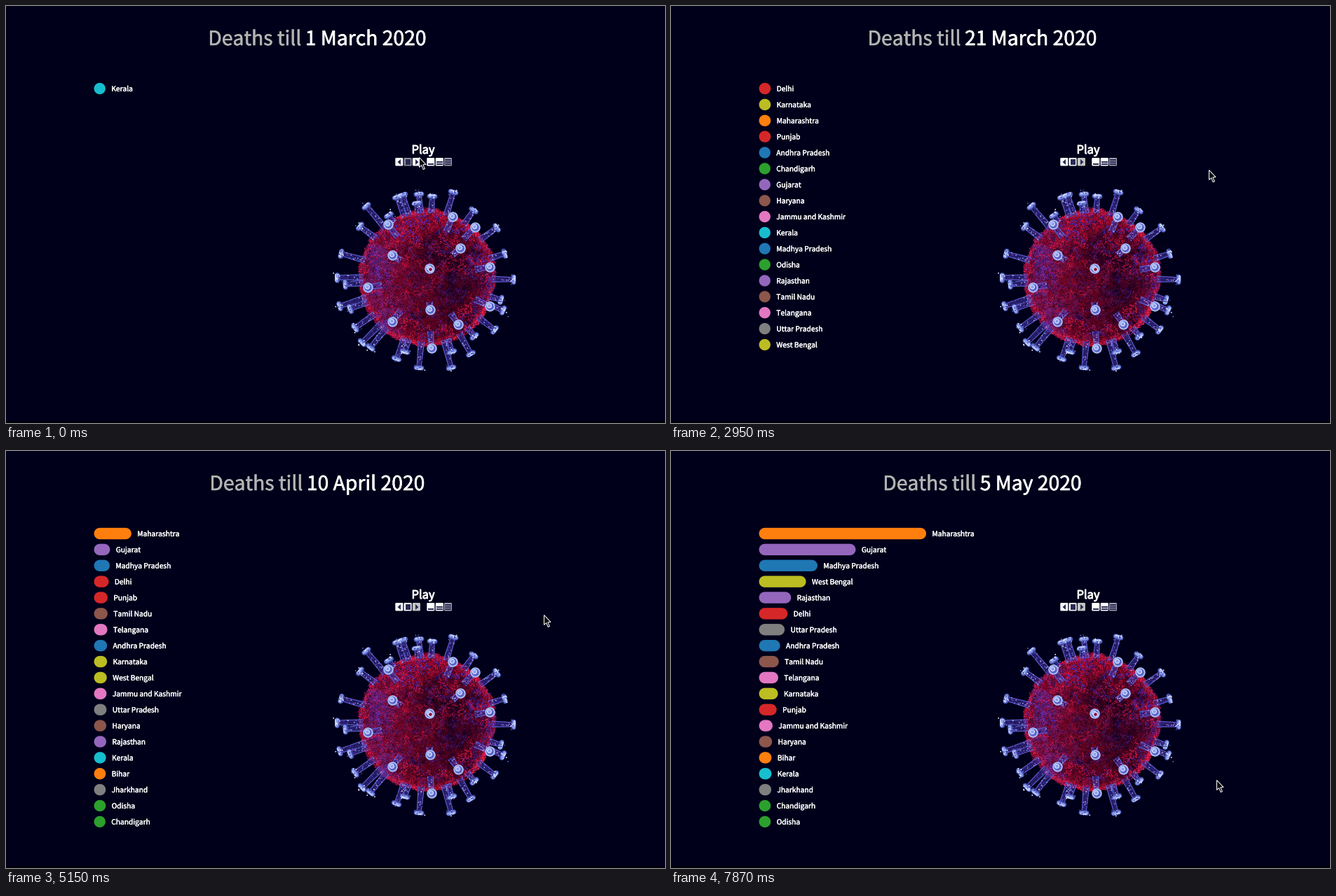
These frames come from a looping animation (940 px wide and 596 px high, 8000 ms). A matplotlib script:

```python
import numpy as np
import matplotlib.pyplot as plt
from matplotlib import patheffects
from matplotlib.animation import FuncAnimation
from matplotlib.collections import LineCollection, PolyCollection
from matplotlib.patches import FancyBboxPatch, Polygon, Rectangle

W, H, DPI = 940, 596, 100
PT = 72 / DPI
LOOP_MS, STEP_MS = 8000, 50
BACK = "#00001a"
FONT = "Noto Sans CJK JP"
rng = np.random.default_rng(4)

# first listed day, first death day, then deaths at KEY_DAYS[1:]; day 1 is 1 March
KEY_DAYS = [20, 32, 41, 49, 57, 66]
STATES = {
    "Andhra Pradesh": (12, 34, 0, 6, 15, 31, 36),
    "Bihar": (22, 23, 1, 1, 2, 2, 4),
    "Chandigarh": (19, 62, 0, 0, 0, 0, 1),
    "Delhi": (2, 14, 2, 12, 42, 54, 64),
    "Gujarat": (20, 23, 6, 17, 48, 133, 319),
    "Haryana": (4, 34, 0, 3, 3, 3, 6),
    "Jammu and Kashmir": (9, 27, 2, 4, 5, 6, 8),
    "Jharkhand": (32, 41, 0, 1, 2, 3, 3),
    "Karnataka": (9, 13, 3, 6, 13, 18, 28),
    "Kerala": (1, 29, 2, 2, 3, 4, 4),
    "Madhya Pradesh": (21, 26, 3, 16, 69, 99, 176),
    "Maharashtra": (9, 18, 9, 97, 201, 323, 583),
    "Odisha": (16, 39, 0, 1, 1, 1, 1),
    "Punjab": (9, 20, 3, 8, 13, 17, 23),
    "Rajasthan": (3, 35, 0, 3, 11, 33, 77),
    "Tamil Nadu": (7, 26, 1, 8, 15, 23, 31),
    "Telangana": (2, 29, 3, 7, 18, 26, 29),
    "Uttar Pradesh": (4, 31, 2, 4, 14, 29, 53),
    "West Bengal": (18, 24, 3, 5, 10, 18, 133),
}
COLORS = ["#1f77b4", "#ff7f0e", "#2ca02c", "#d62728", "#9467bd",
          "#8c564b", "#e377c2", "#7f7f7f", "#bcbd22", "#17becf"]

fig = plt.figure(figsize=(W / DPI, H / DPI), dpi=DPI, facecolor=BACK)
ax = fig.add_axes([0, 0, 1, 1])


def label(x, y, text, size, color="white", stroke=0.35):
    return ax.text(x, y, text, fontsize=size * PT, color=color, family=FONT,
                   va="baseline", ha="left",
                   path_effects=[patheffects.withStroke(
                       linewidth=stroke * PT, foreground=color)])


# ---- virus ----
CENTER, RADIUS = np.array([601.0, 388.0]), 98


def noise(n, slope):
    freq = np.hypot(*np.meshgrid(np.fft.fftfreq(n), np.fft.fftfreq(n)))
    freq[0, 0] = 1
    field = np.fft.ifft2(np.fft.fft2(rng.normal(size=(n, n))) / freq ** slope).real
    return (field - field.mean()) / field.std()


def ridge(field, width):
    return np.exp(-(field / width) ** 2)


def virus_body():
    n = 2 * RADIUS + 12
    yy, xx = (np.mgrid[:n, :n] - n / 2 + 0.5) / RADIUS
    rad = np.hypot(xx, yy)
    rgb = np.zeros((n, n, 3))

    def blend(color, amount):
        nonlocal rgb
        amount = np.clip(amount, 0, 1)[..., None]
        rgb = rgb * (1 - amount) + np.array(color) / 255 * amount

    blend((98, 4, 34), np.ones((n, n)))
    blend((160, 10, 48), 0.4 + 0.3 * noise(n, 1.3))
    blend((24, 0, 32), 0.3 * noise(n, 1.1) + 0.25 * (xx > 0.3))
    blend((125, 45, 165), (0.9 * np.exp(-((xx + 0.68) / 0.25) ** 2)
                           + 0.6 * np.exp(-((xx - 0.88) / 0.16) ** 2))
          * (0.5 + 0.3 * noise(n, 1)))
    blend((235, 28, 75), ridge(noise(n, 1.4), 0.16) * (0.45 + 0.5 * rad))
    blend((62, 50, 215), ridge(noise(n, 1.4), 0.17) * (0.25 + 0.6 * rad - 0.25 * yy))
    blend((230, 28, 70), ridge(rad - 0.96, 0.05) * (0.5 + 0.35 * noise(n, 0.8)))
    blend((16, 0, 40), 0.35 * (noise(n, 0.6) - 0.6))
    rgb *= rng.uniform(0.65, 1.2, (n, n, 1))
    edge = RADIUS * (1 - rad) + 1.2 * noise(n, 1)
    return np.dstack([np.clip(rgb, 0, 1), np.clip(edge + 0.5, 0, 1)])


TIPS = np.array([
    (514, 286), (558, 273), (566, 270), (589, 269), (586, 282), (608, 272),
    (638, 266), (667, 292), (637, 301), (700, 317), (711, 354), (724, 391),
    (690, 373), (648, 346), (545, 312), (505, 315), (478, 354), (551, 356),
    (472, 388), (484, 398), (516, 402), (476, 429), (491, 433), (498, 460),
    (508, 481), (520, 488), (557, 504), (569, 494), (589, 517), (635, 517),
    (636, 494), (663, 497), (645, 455), (697, 463), (709, 435), (706, 420),
    (690, 429), (605, 434), (604, 375), (551, 451), (607, 489), (669, 316),
    (546, 299), (668, 472)], float)


def draw_virus():
    size = RADIUS + 6
    cx, cy = CENTER
    ax.imshow(virus_body(), extent=(cx - size, cx + size, cy + size, cy - size),
              interpolation="bilinear", zorder=2)

    arm = TIPS - CENTER
    dist = np.hypot(*arm.T)[:, None]
    unit = arm / dist
    side = unit[:, ::-1] * [-1, 1]
    outer = dist[:, 0] > 104
    base = np.where(outer[:, None], CENTER + unit * 92, CENTER + arm * 0.76)
    left = np.stack([base + side * 4.2, TIPS + side * 3], 1)
    right = np.stack([base - side * 4.2, TIPS - side * 3], 1)
    ax.add_collection(PolyCollection(np.concatenate([left, right[:, ::-1]], 1),
                                     facecolor=(0.25, 0.2, 0.62, 0.6), zorder=3))
    ax.add_collection(LineCollection(np.concatenate([left, right]), zorder=3,
                                     colors="#5f60d2", linewidths=1.1 * PT))

    # glassy speckle along the stalks
    along = rng.uniform(0, 1, (len(TIPS), 22, 1))
    across = rng.uniform(-3.5, 3.5, (len(TIPS), 22, 1))
    dots = base[:, None] + (TIPS - base)[:, None] * along + side[:, None] * across
    tones = np.array(["#3434b4", "#8a7de0", "#b9b4f5", "#150a3c", "#7a3fb0"])
    ax.scatter(*dots.reshape(-1, 2).T, s=1.3, linewidths=0, zorder=3.2,
               c=tones[rng.integers(0, 5, dots.size // 2)])

    caps = np.stack([TIPS - side * 4, TIPS + side * 4], 1)[outer]
    for width, color, shift in ((7, "#4c58b8", 0), (4.5, "#8fa0ec", 0.6),
                                (1.5, "#cdd8ff", 1.8)):
        ax.add_collection(LineCollection(caps + (unit * shift)[outer][:, None],
                                         colors=color, linewidths=width * PT,
                                         capstyle="round", zorder=4))
    knobs = (TIPS[outer][:, None] + rng.normal(0, 3, (outer.sum(), 9, 2))).reshape(-1, 2)
    ax.scatter(*knobs.T, s=1.8, linewidths=0, zorder=4.2,
               c=np.array(["#e2eaff", "#5a68d0", "#3a3f96"])[rng.integers(0, 3, len(knobs))])

    inner = TIPS[~outer]
    ax.scatter(*inner.T, s=80, c="#5a62c8", edgecolors="#a9bdf5",
               linewidths=2 * PT, zorder=5)
    ax.scatter(*(inner + [-1, -1]).T, s=18, c="#8ea0ee", edgecolors="#d5e2ff",
               linewidths=1.2 * PT, zorder=5)
    ax.scatter([604.5], [376], s=20, c="#8c1240", edgecolors="#cfdcff",
               linewidths=1.6 * PT, zorder=6)


# ---- player buttons ----
def button(x, color):
    patch = FancyBboxPatch((x + 1, 218), 9, 9.5, boxstyle="round,pad=1,rounding_size=1.2",
                           fc=color, ec="none", zorder=3)
    return ax.add_patch(patch)


def block(x, y, w, h, color="#2a2a55"):
    ax.add_patch(Rectangle((x, y), w, h, fc=color, ec="none", zorder=4))


def draw_buttons():
    button(555.3, "white")
    ax.add_patch(Polygon([(563, 219), (563, 227), (558.5, 223)], fc="#2a2a55", zorder=4))
    stop = button(567.6, "#8c8c9c")
    block(569.5, 219, 7.2, 7.6)
    play = button(579.9, "white")
    ax.add_patch(Polygon([(584, 219), (584, 227), (588.5, 223)], fc="#2a2a55", zorder=4))
    button(600.3, "white")
    block(602, 225, 8, 1.5)
    button(612.8, "white")
    block(614, 222, 9, 1.5)
    block(614, 225.2, 9, 1.5)
    button(625, "#a0a0b0")
    for y in (219, 222, 225):
        block(626.3, y, 9, 1.6)
    return stop, play


draw_virus()
stop_button, play_button = draw_buttons()
ax.add_patch(Rectangle((0, 594), W, 2, fc="black", ec="none"))
label(578.5, 211, "Play", 16.5, stroke=0.9)
title = label(0, 56, "Deaths till", 28.3, "#b3b3b3", 0.5)
date_text = label(0, 56, "", 28.3, stroke=0.6)

bars, names = {}, {}
for i, state in enumerate(STATES):
    bars[state], = ax.plot([], [], color=COLORS[i % 10], lw=16.4 * PT,
                           solid_capstyle="round", snap=False)
    names[state] = label(0, 0, state, 10.2)

ARROW = np.array([(0.5, 0.5), (0.5, 14.5), (3.6, 11.6), (6.2, 17.6),
                  (8.4, 16.6), (5.8, 10.8), (10, 10.5)])
cursor = ax.add_patch(Polygon(ARROW, fc="#08080c", ec="white", lw=1 * PT, zorder=9))

ax.set(xlim=(0, W), ylim=(H, 0), aspect="auto")
ax.axis("off")


# ---- motion ----
def day_at(ms):
    if ms < 900:
        return 1
    return int(np.interp(ms, [900, 1390, 2940, 4200, 5140, 6090, 7850, 8000],
                         [2.1, 6.6, 21.1, 32.4, 41.3, 49.6, 66.3, 67.6]))


def date_label(day):
    for month, length in (("March", 31), ("April", 30), ("May", 31)):
        if day <= length:
            return f"{day} {month} 2020"
        day -= length


def deaths_on(state, day):
    _, first, *counts = STATES[state]
    if day < first:
        return 0
    value = int(np.expm1(np.interp(day, KEY_DAYS, np.log1p([0] + counts))) + 1e-6)
    if state == "West Bengal" and day < 66:
        value = min(value, 35)
    return max(1, value)


def cursor_at(ms):
    if ms < 900:
        return 589, 216 if ms < 80 else 218
    times = [1450, 1600, 1750, 1900, 2000, 2150, 7200, 7350, 7550, 7750, 7850]
    xs = [597, 650, 710, 755, 762, 767, 767, 785, 799, 788, 778]
    ys = [218, 290, 338, 320, 280, 234, 234, 300, 390, 450, 470]
    return np.interp(ms, times, xs), np.interp(ms, times, ys)


def update(frame):
    ms = frame * STEP_MS
    day = day_at(ms)

    date_text.set_text(date_label(day))
    date_text.set_x(0)
    left = 445 - (138 + date_text.get_window_extent().width) / 2
    title.set_x(left - 1.5)
    date_text.set_x(left + 137)

    totals = {s: deaths_on(s, day) for s in STATES if STATES[s][0] <= day}
    ranking = sorted(totals, key=lambda s: (-totals[s], s))
    for state in STATES:
        shown = state in totals
        bars[state].set_visible(shown)
        names[state].set_visible(shown)
        if shown:
            y = 118 + 22.88 * ranking.index(state)
            grow = 0.381 * totals[state]
            bars[state].set_data([133.7, 133.72 + grow], [y, y])
            names[state].set_position((150.3 + grow, y + 3.9))

    play_button.set_facecolor("white" if ms < 80 else "#c4c4c4")
    stop_button.set_facecolor("#8c8c9c" if ms < 690 else "white")
    cursor.set_visible(not 230 <= ms < 900)
    cursor.set_xy(ARROW + cursor_at(ms))
    return []


anim = FuncAnimation(fig, update, frames=LOOP_MS // STEP_MS, interval=STEP_MS,
                     repeat=True, repeat_delay=0, blit=False)
plt.show()
```
